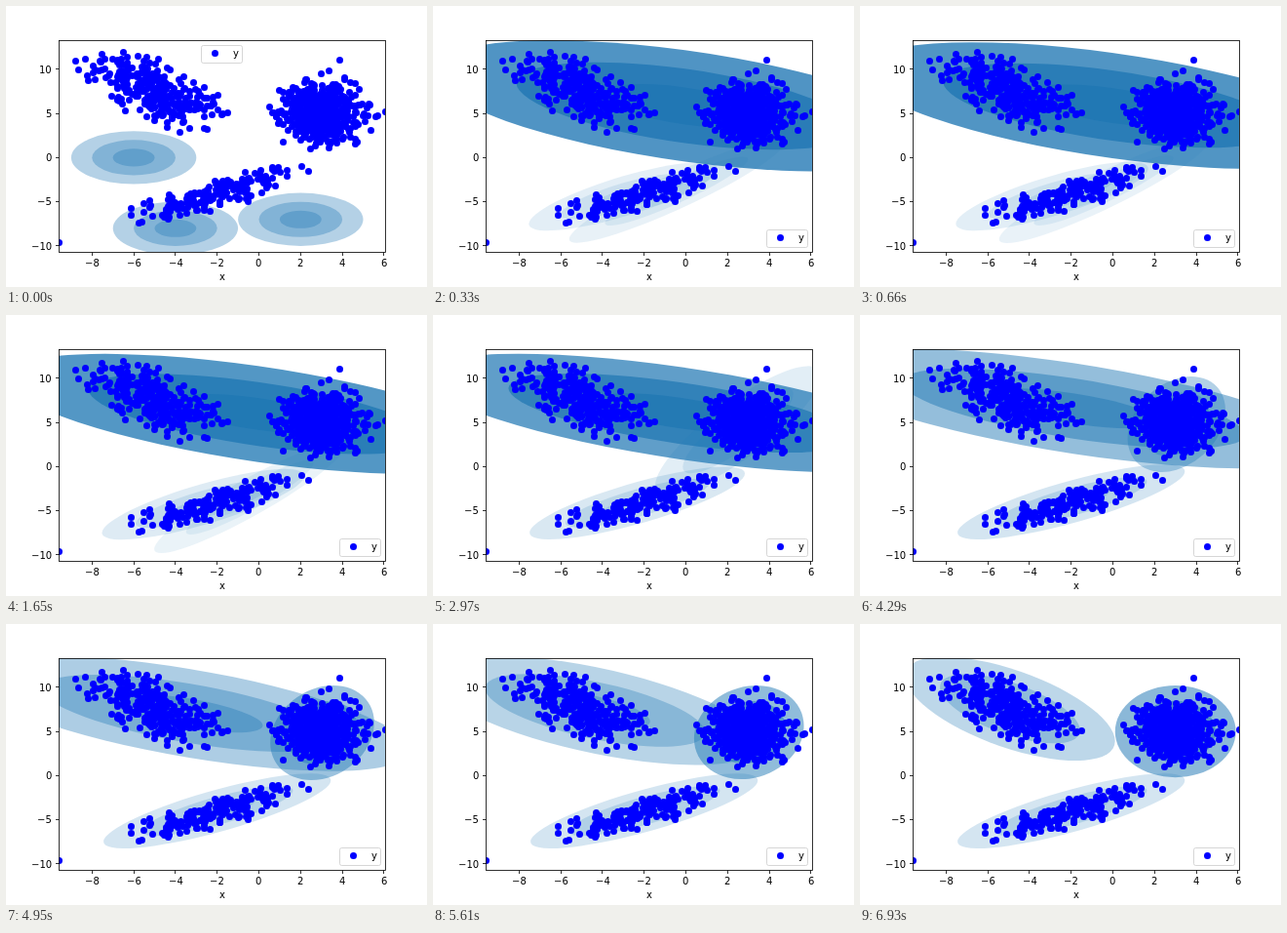
Animation, 432 px wide and 288 px high, one loop 7.92 s. Source, as an HTML page with a canvas:

```html
<!DOCTYPE html>
<html lang="en">
<head>
<meta charset="utf-8">
<title>Gaussian mixture fit</title>
<style>
  html, body { margin: 0; width: 100%; height: 100%; overflow: hidden; background: #fff; }
  canvas { display: block; width: 432px; height: 288px; }
</style>
</head>
<body>
<canvas id="plot" width="432" height="288"></canvas>
<script>
const ctx = document.getElementById('plot').getContext('2d');
const LOOP = 7920, STEP = 330, LAST = 21;
const SX = 21.4, SY = -9.05;
const px = v => 259.5 + SX * v;
const py = v => 155.4 + SY * v;
const snap = v => Math.floor(v) + .5;

// Every Gaussian is [mean x, mean y, var x, covariance, var y]
const A = [-5, 7.6, 2.3, -1.9, 3.8];
const B = [3, 5, .93, 0, 3];
const C = [-2, -4, 3.3, 2.1, 2];
const SHARE = { a: .29, b: .48, c: .19 };

let seed = 11;
function random() {
  seed = (seed * 16807) % 2147483647;
  return seed / 2147483647;
}

function sample([mx, my, xx, xy, yy], count, cut) {
  return Array.from({ length: count }, () => {
    const r = Math.sqrt(-2 * Math.log(1 - random() * (1 - Math.exp(-cut * cut / 2))));
    const a = 2 * Math.PI * random();
    const u = r * Math.cos(a) / Math.sqrt(xx), v = r * Math.sin(a);
    return [mx + xx * u, my + xy * u + Math.sqrt(yy - xy * xy / xx) * v];
  });
}

const points = [
  [-9.58, -9.6], [6.07, 5.2], [3.9, 11],
  ...sample(A, 290, 2.6), ...sample(B, 530, 2.8), ...sample(C, 190, 2.5)
];

// One Gaussian with the mean and covariance of a weighted mixture
function merge(parts) {
  const total = parts.reduce((sum, [w]) => sum + w, 0);
  const mean = f => parts.reduce((sum, [w, g]) => sum + w * f(g), 0) / total;
  const mx = mean(g => g[0]), my = mean(g => g[1]);
  return [
    mx, my,
    mean(g => g[2] + (g[0] - mx) ** 2),
    mean(g => g[3] + (g[0] - mx) * (g[1] - my)),
    mean(g => g[4] + (g[1] - my) ** 2)
  ];
}

const mix = (p, q, t) => p.map((v, i) => v + (q[i] - v) * t);

function track(keys, step) {
  let i = 0;
  while (i < keys.length - 2 && step > keys[i + 1][0]) i++;
  const [[t0, p], [t1, q]] = [keys[i], keys[i + 1]];
  return mix(p, q, Math.min(1, (step - t0) / (t1 - t0)));
}

// The narrow component climbs from the lower cluster into the right one
const climb = [
  [1, [-.45, -3.8, 2.94, 3.1, 3.8]],
  [5, [-.44, -3.5, 2.33, 2.97, 4.41]],
  [9, [2.5, 4.1, 1.75, 2.73, 5.9]],
  [13, [3.05, 4.8, .61, .42, 3.26]],
  [LAST, B]
];
const settle = [[1, [-3, -4.4, 2.28, 1.56, 1.66]], [13, C]];

function components(step) {
  if (!step) {
    return [[-6, 0], [-4, -8], [2, -7]].map(([x, y]) => [[x, y, 1, 0, 1], 1 / 3]);
  }
  // The wide component gradually gives up the right cluster
  const held = SHARE.b / (1 + Math.exp(.6 * (step - 12.2)));
  const leak = .01 * Math.exp((1 - step) / 2.5);
  const wide = SHARE.a + held + leak;
  const low = SHARE.c - .07 * Math.max(0, (13 - step) / 12);
  return [
    [merge([[SHARE.a, A], [held, B], [leak, C]]), wide],
    [track(climb, step), 1 - wide - low],
    [track(settle, step), low]
  ];
}

function drawComponent([[mx, my, xx, xy, yy], weight]) {
  const sx = Math.sqrt(xx);
  ctx.save();
  ctx.transform(SX * sx, SY * xy / sx, 0, SY * Math.sqrt(yy - xy * xy / xx), px(mx), py(my));
  ctx.globalAlpha = weight;
  ctx.fillStyle = '#1f77b4';
  for (const r of [3, 2, 1]) {
    ctx.beginPath();
    ctx.arc(0, 0, r, 0, 2 * Math.PI);
    ctx.fill();
  }
  ctx.restore();
}

function dot(x, y) {
  ctx.beginPath();
  ctx.arc(snap(x), snap(y), 3.5, 0, 2 * Math.PI);
  ctx.fillStyle = '#00f';
  ctx.fill();
}

// anchor: 0 left, .5 centre, 1 right
function text(s, x, y, anchor) {
  ctx.fillStyle = '#000';
  ctx.fillText(s, Math.round(x - anchor * ctx.measureText(s).width), Math.round(y));
}

function line(x1, y1, x2, y2) {
  ctx.beginPath();
  ctx.moveTo(x1, y1);
  ctx.lineTo(x2, y2);
  ctx.stroke();
}

function drawAxes() {
  const label = v => String(v).replace('-', '\u2212');
  ctx.strokeStyle = '#000';
  ctx.lineWidth = .8;
  ctx.strokeRect(54.5, 35.5, 335, 217);
  for (let v = -8; v <= 6; v += 2) {
    line(snap(px(v)), 252.5, snap(px(v)), 256);
    text(label(v), px(v), 267, .5);
  }
  for (let v = -10; v <= 10; v += 5) {
    line(51, snap(py(v)), 54.5, snap(py(v)));
    text(label(v), 47, py(v) + 3.8, 1);
  }
  text('x', 221.5, 281, .5);
}

function drawLegend(x, y) {
  ctx.beginPath();
  ctx.roundRect(x, y, 42, 18, 2);
  ctx.fillStyle = 'rgba(255,255,255,.8)';
  ctx.fill();
  ctx.strokeStyle = 'rgba(204,204,204,.8)';
  ctx.lineWidth = 1;
  ctx.stroke();
  dot(x + 14, y + 8);
  text('y', x + 32, y + 11.5, 0);
}

function draw(step) {
  ctx.fillStyle = '#fff';
  ctx.fillRect(0, 0, 432, 288);
  ctx.font = '10px "DejaVu Sans", sans-serif';
  ctx.save();
  ctx.beginPath();
  ctx.rect(54, 35, 335, 217);
  ctx.clip();
  components(step).forEach(drawComponent);
  for (const [x, y] of points) dot(px(x), py(y));
  ctx.restore();
  drawAxes();
  if (step) drawLegend(342.5, 229.5);
  else drawLegend(200.5, 40.5);
}

let shown = -1;
function tick() {
  const step = Math.min(LAST, Math.floor(performance.now() % LOOP / STEP));
  if (step !== shown) draw(shown = step);
  requestAnimationFrame(tick);
}
tick();
</script>
</body>
</html>
```
